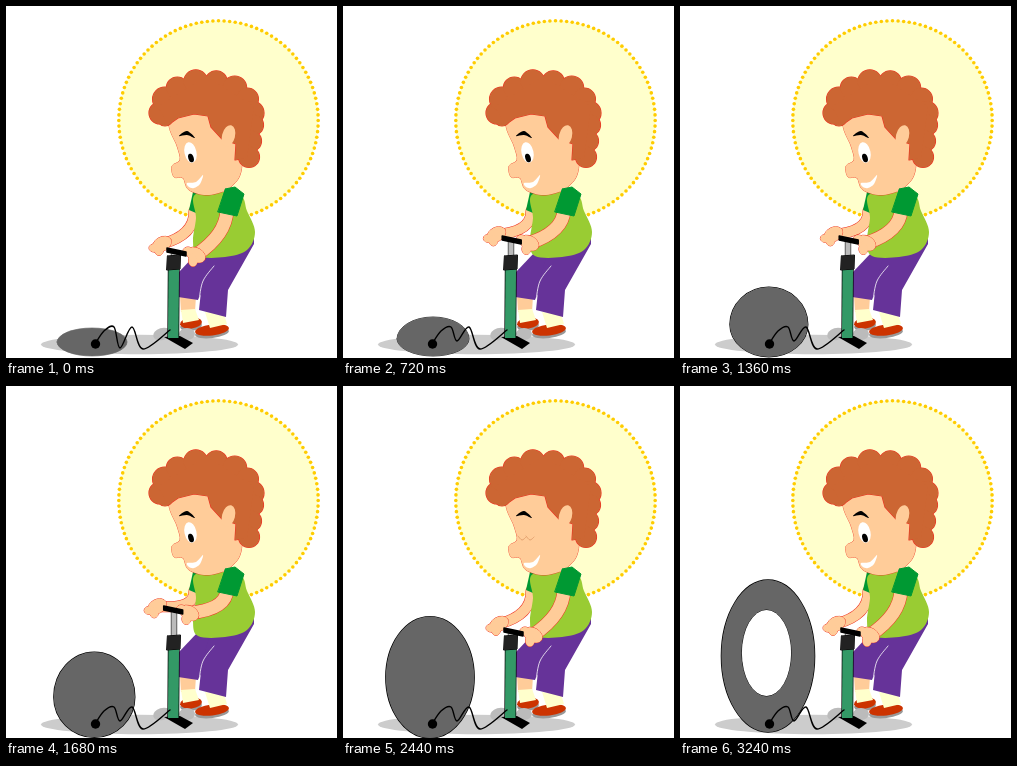
Recreate the animation shown at these times as an HTML page with a canvas. Size 331 by 352 pixels, loop 3280 ms.

```html
<!DOCTYPE html>
<html lang="en">
<head>
<meta charset="utf-8">
<title>Boy with a foot pump</title>
<style>
html, body { margin: 0; width: 100%; height: 100%; overflow: hidden; background: #fff; }
canvas { display: block; width: 331px; height: 352px; }
</style>
</head>
<body>
<canvas id="stage" width="331" height="352"></canvas>
<script>
const ctx = document.getElementById('stage').getContext('2d');
const STEP = 40, FRAMES = 82, PUMP = 16;
const SKIN = '#ffcc99', RED = '#ee3322', HAIR = '#cc6633', GREEN = '#009933';
const LIME = '#99cc33', PURPLE = '#663399', CREAM = '#ffffcc', SHOE = '#cc3300';
const GREY = '#666', PALE = '#bbb', INK = '#000';

function paint(path, fill, line, width = 0.7) {
  if (line) { ctx.strokeStyle = line; ctx.lineWidth = width; ctx.stroke(path); }
  if (fill) { ctx.fillStyle = fill; ctx.fill(path); }
}

// Several shapes merged under one outline
function merge(paths, fill, line, width) {
  for (const p of paths) paint(p, null, line, width);
  for (const p of paths) paint(p, fill);
}

function oval(x, y, rx, ry = rx, turn = 0) {
  const p = new Path2D();
  p.ellipse(x, y, rx, ry, turn, 0, Math.PI * 2);
  return p;
}

function poly(...v) {
  const p = new Path2D();
  for (let i = 0; i < v.length; i += 2) p.lineTo(v[i], v[i + 1]);
  p.closePath();
  return p;
}

// Smooth curve through x,y pairs
function curve(v, closed = true) {
  const n = v.length / 2, p = new Path2D();
  const at = i => {
    const j = closed ? (i + n) % n : Math.max(0, Math.min(n - 1, i));
    return [v[j * 2], v[j * 2 + 1]];
  };
  p.moveTo(v[0], v[1]);
  for (let i = 0; i < (closed ? n : n - 1); i++) {
    const [a, b, c, d] = [at(i - 1), at(i), at(i + 1), at(i + 2)];
    p.bezierCurveTo(b[0] + (c[0] - a[0]) / 6, b[1] + (c[1] - a[1]) / 6,
      c[0] - (d[0] - b[0]) / 6, c[1] - (d[1] - b[1]) / 6, c[0], c[1]);
  }
  return p;
}

// A bent arm of even width
function arm(x0, y0, ex, ey, x1, y1, width) {
  const p = new Path2D();
  p.moveTo(x0, y0);
  p.quadraticCurveTo(ex, ey, x1, y1);
  paint(p, null, RED, width + 1);
  paint(p, null, SKIN, width);
}

function hand(x, y, dir) {
  merge([
    oval(x, y, 10, 7, dir * 0.5),
    oval(x - 8, y - dir * 4, 5, 4),
    oval(x - 3, y + 6, 4.5, 5.5)
  ], SKIN, RED, 1);
}

function drawSun() {
  const dots = 112, x = 212.5, y = 114.5, r = 99.7;
  paint(oval(x, y, r), CREAM);
  for (let i = 0; i < dots; i++) {
    const a = i / dots * Math.PI * 2;
    paint(oval(x + r * Math.cos(a), y + r * Math.sin(a), 1.8), '#ffcc00');
  }
}

// Slow first swelling, then steady growth into a tall oval
function drawTube(f) {
  if (f === FRAMES - 1) {
    paint(oval(88, 270, 46.6, 76), GREY, INK, 1.4);
    paint(oval(86.5, 267, 24.6, 43), '#fff', INK, 1);
    return;
  }
  const k = Math.min(f, 18) / 18, s = Math.max(0, Math.min(f, 79) - 18);
  const x = 86 + 4 * k - 0.07 * s, rx = 35 + k + 0.19 * s;
  const top = 322 - 11 * k - 1.87 * s, bottom = 350 + Math.min(2, s / 18);
  const mid = top + (bottom - top) * (0.5 + 0.06 * k * Math.max(0, 1 - s / 43));
  const p = new Path2D();
  p.ellipse(x, mid, rx, mid - top, 0, Math.PI, 0);
  p.ellipse(x, mid, rx, bottom - mid, 0, 0, Math.PI);
  paint(p, GREY, INK, 0.4 + Math.min(1, f / 50));
}

function drawHose(f) {
  const dip = 342 - 7 * Math.min(1, f / 18);
  paint(curve([89, 338, 98, 325, 108, 321, 114, dip, 126, 321, 137, 343, 164, 324], false), null, INK, 1.4);
  paint(oval(89.5, 338, 4.7), INK);
}

function shoe(x, y, w) {
  paint(oval(x, y + 2, w, 5, -0.12), '#999');
  paint(oval(x, y - 1, w, 5.5, -0.12), SHOE);
}

function drawLegs() {
  paint(poly(174, 290, 190, 290, 189, 306, 175, 306), SKIN);
  shoe(185, 318, 11);
  paint(poly(175, 304, 189, 303, 193, 314, 177, 317), CREAM);
  paint(poly(191, 247, 173, 266, 172, 291, 192, 294, 215, 250), PURPLE);
  shoe(206, 325, 17);
  paint(poly(199, 306, 218, 308, 221, 318, 204, 322), CREAM);
  paint(poly(205, 245, 248, 222, 248, 238, 222, 284, 220, 311, 193, 304, 196, 276), PURPLE);
  paint(curve([193, 294, 197, 275, 208, 260], false), null, '#fff', 0.8);
}

function drawHair() {
  const curls = [oval(159, 112, 8)];
  for (let i = 0; i < 8; i++) {
    const a = Math.PI * (1 + i / 7);
    curls.push(oval(200 + 46 * Math.cos(a), 107 + 32 * Math.sin(a), 11 + i % 2));
  }
  for (let i = 0; i < 3; i++) curls.push(oval(247 - 2 * i, 119 + 16 * i, 10.5));
  curls.push(poly(162, 119, 152, 100, 200, 70, 248, 100, 241, 152, 229, 154,
    230, 138, 216, 133, 205, 121, 202, 110, 188, 108, 172, 112));
  merge(curls, HAIR, RED, 1.2);
}

function drawHead(closed) {
  paint(curve([163, 118, 171, 140, 174, 154, 166, 160, 168, 171, 177, 172,
    183, 184, 203, 189, 226, 180, 236, 158, 230, 105, 175, 100]), SKIN, RED, 0.8);
  // A mask of skin keeps the fringe over the brow
  drawHair();
  paint(oval(222.5, 130, 6.5, 11, 0.25), SKIN);
  paint(curve([173, 130, 181, 125, 189, 132, 181, 129]), INK);
  if (closed) {
    for (const x of [179, 187]) paint(curve([x - 4, 150, x, 154, x + 4, 151], false), null, '#dd9966', 0.8);
  } else {
    paint(oval(184.5, 146.5, 6, 10.5, -0.22), '#fff');
    paint(oval(185, 152, 2.7, 4.4, -0.3), INK);
  }
  paint(curve([181, 177, 190, 176, 197, 169, 194, 178, 188, 182, 183, 181]), '#fff');
}

function drawPump(lift) {
  const y = 245 - lift, x = 171 - lift * 0.15;
  paint(oval(156, 328, 9, 6, -0.3), PALE);
  paint(oval(181, 328, 8, 6), PALE);
  paint(poly(158, 331, 174, 330, 187, 337, 179, 343), INK);
  paint(poly(162.5, 262, 173, 262, 172.5, 332, 162, 332), '#339966', INK, 1.4);
  paint(poly(165.5, y, 170.5, y, 170.5, 252, 165.5, 252), PALE, '#333', 1.4);
  paint(poly(161, 250, 174.5, 249, 174, 263, 161, 264), '#222', INK, 1);
  paint(poly(x - 10, y - 3, x + 9, y + 1, x + 9, y + 5, x - 10, y + 1), INK, INK, 1.5);
}

// Pressed, half raised, raised, half raised
function liftAt(phase) {
  if (phase < 2 || phase > 11) return 0;
  return phase < 6 || phase === 11 ? 12 : 22;
}

function draw(f) {
  const phase = f % PUMP, lift = liftAt(phase);
  const back = [156 - lift * 0.22, 238 - lift * 0.8];
  const front = [190 - lift * 0.3, 249 - lift];
  ctx.fillStyle = '#fff';
  ctx.fillRect(0, 0, 331, 352);
  drawSun();
  paint(oval(133.5, 338.5, 98.5, 9.7), '#ccc');
  drawTube(f);
  drawLegs();
  arm(188, 205, 189, 229 - lift / 4, ...back, 10);
  hand(...back, -1);
  paint(poly(187, 186, 193, 187, 190, 207, 183, 204), GREEN);
  paint(curve([190, 188, 232, 188, 241, 205, 249, 226, 241, 244, 219, 251, 192, 250, 187, 235, 190, 212]), LIME);
  drawHead(phase > 11 && phase < 15);
  arm(221, 204, 220, 229 - lift / 4, ...front, 13);
  hand(...front, 1);
  paint(poly(219, 183, 229, 181, 238, 188, 231, 210, 212, 206), GREEN, GREEN, 1);
  drawPump(lift);
  drawHose(f);
}

ctx.lineJoin = ctx.lineCap = 'round';
const start = performance.now();
function tick() {
  draw(Math.floor((performance.now() - start) / STEP) % FRAMES);
  requestAnimationFrame(tick);
}
draw(0);
requestAnimationFrame(tick);
</script>
</body>
</html>
```
